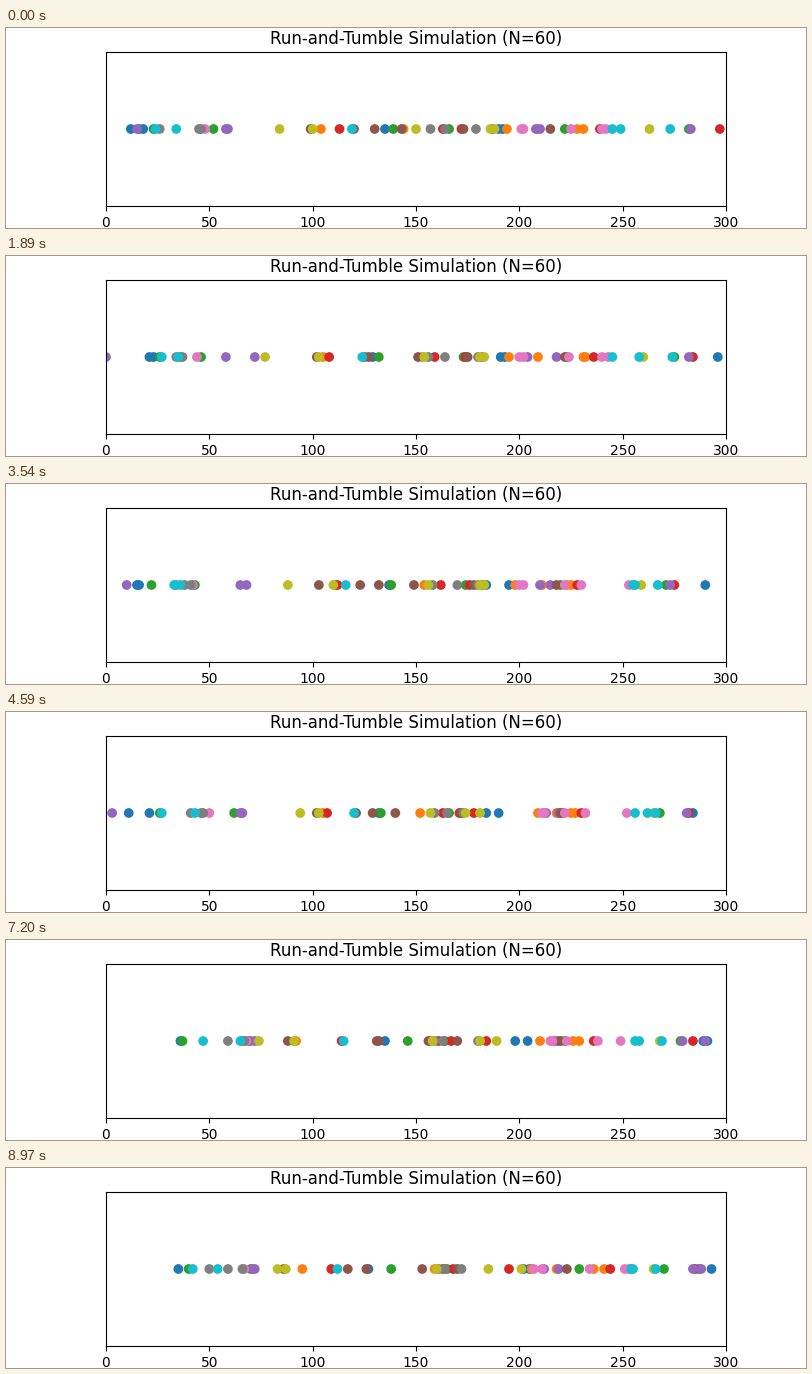
Recreate the animation shown at these times as a matplotlib script. Size 800x200 px, loop 9 s.

```python
import numpy as np
import matplotlib.pyplot as plt
from matplotlib.animation import FuncAnimation

N = 60
LENGTH = 300
FRAMES = 300
INTERVAL = 30
TUMBLE = 0.5
WARM_UP = 4

# Crowding along the ring: rank of a particle -> its site.
RANKS = [0, 6, 8, 13, 15, 30, 49, 53, 59]
SITES = [12, 25, 45, 61, 97, 171, 230, 246, 294]


def step(pos, heading, taken, rng):
    """Tumble at random, then run one site ahead if it is free."""
    tumbling = rng.random(N) < TUMBLE
    heading[tumbling] = rng.choice([-1, 1], tumbling.sum())
    for i in rng.permutation(N):
        ahead = (pos[i] + heading[i]) % LENGTH
        if not taken[ahead]:
            taken[pos[i]], taken[ahead] = False, True
            pos[i] = ahead


def simulate(seed=3):
    rng = np.random.default_rng(seed)
    sites = np.rint(np.interp(np.arange(N), RANKS, SITES)).astype(int)
    pos = rng.permutation(sites)
    heading = rng.choice([-1, 1], N)
    taken = np.zeros(LENGTH, dtype=bool)
    taken[pos] = True
    path = []
    for _ in range(WARM_UP + FRAMES):
        step(pos, heading, taken, rng)
        path.append(pos.copy())
    return np.array(path[WARM_UP:])


paths = simulate()

fig, ax = plt.subplots(figsize=(8, 2), dpi=100)
ax.set_xlim(0, LENGTH)
ax.set_ylim(-1, 1)
ax.set_yticks([])
ax.set_title(f"Run-and-Tumble Simulation (N={N})")
colors = plt.get_cmap("tab10")(np.repeat(np.arange(10), N // 10))
dots = ax.scatter(paths[0], np.zeros(N), c=colors)


def update(i):
    dots.set_offsets(np.column_stack([paths[i], np.zeros(N)]))
    return (dots,)


anim = FuncAnimation(fig, update, frames=FRAMES, interval=INTERVAL,
                     repeat=True, repeat_delay=0)
plt.show()
```
